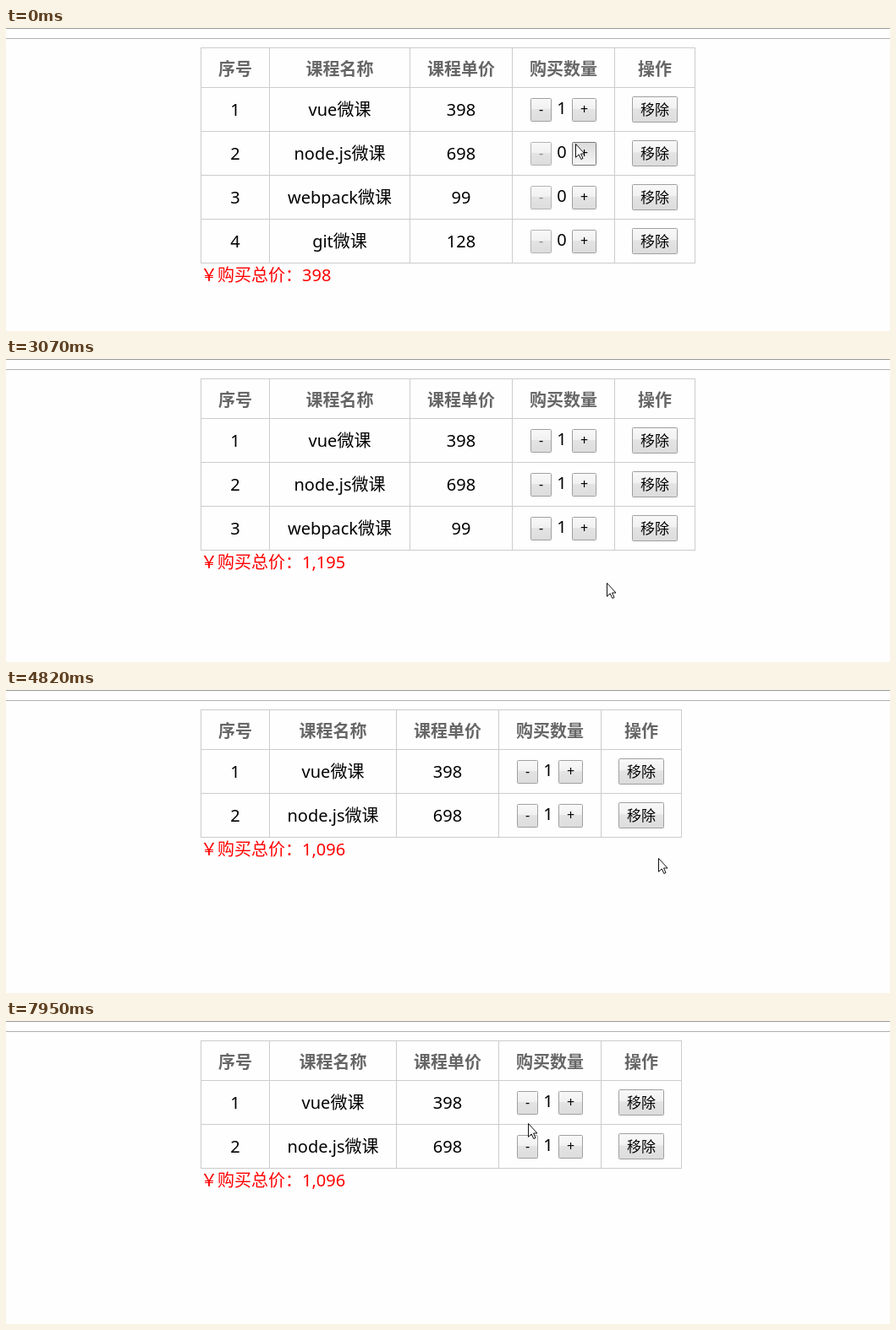
Recreate the animation shown at these times as an HTML page. Size 1045x359 px, loop 8 s.

```html
<!DOCTYPE html>
<html lang="zh-CN">
<head>
<meta charset="utf-8">
<title>购物车</title>
<style>
html, body { margin: 0; width: 100%; height: 100%; overflow: hidden; background: #fefefe; }
svg { display: block; width: 1045px; height: 359px; }
text { font: 20px "Noto Sans", "Noto Sans CJK SC", "Noto Sans CJK", sans-serif; text-anchor: middle; }
.head { font-weight: bold; fill: #666; }
.btn { font-size: 17px; }
.sign { font-size: 16px; }
.off { fill: #8a8a8a; }
.total { text-anchor: start; fill: #f00; }
.picked { fill: #fff; }
</style>
</head>
<body>
<svg viewBox="0 0 1045 359">
  <defs>
    <linearGradient id="up" x2="0" y2="1">
      <stop stop-color="#f8f8f8"/><stop offset=".46" stop-color="#f1f1f1"/>
      <stop offset=".47" stop-color="#e4e4e4"/><stop offset="1" stop-color="#dcdcdc"/>
    </linearGradient>
    <linearGradient id="over" x2="0" y2="1">
      <stop stop-color="#f2f2f2"/><stop offset="1" stop-color="#dfdfdf"/>
    </linearGradient>
    <linearGradient id="down" x2="0" y2="1">
      <stop stop-color="#dadada"/><stop offset="1" stop-color="#f6f6f6"/>
    </linearGradient>
  </defs>
  <path d="M0 .5H1045" stroke="#999"/>
  <path d="M0 12.5H1045" stroke="#b0b0b0"/>
  <g id="scene"></g>
</svg>
<script>
const LOOP = 8000, LEFT = 230, TOP = 23, HEAD = 47, ROW = 52;
const HEADS = ['序号', '课程名称', '课程单价', '购买数量', '操作'];
const courses = [
  { name: 'vue微课', price: 398, added: 0 },
  { name: 'node.js微课', price: 698, added: 150 },
  { name: 'webpack微课', price: 99, added: 830, removed: 4820 },
  { name: 'git微课', price: 128, added: 1385, removed: 2720 }
];
const presses = [[0, 150], [690, 830], [1250, 1385], [2590, 2720], [4700, 4820]];

// pointer strokes: first and last jump, jumps, bend x y, end x y
const strokes = [
  [286, 557, 3, 678, 170, 681, 199],
  [964, 1100, 2, 684, 228, 681, 252],
  [1520, 2060, 5, 772, 147, 779, 262],
  [2850, 3760, 8, 560, 275, 330, 240],
  [3890, 4150, 3, 430, 240, 585, 247],
  [4296, 4565, 3, 710, 235, 771, 199],
  [4960, 5370, 4, 680, 220, 575, 195],
  [5650, 5790, 2, 500, 195, 449, 190],
  [5930, 6080, 2, 530, 180, 621, 167],
  [6610, 6610, 1, 622, 167, 624, 166],
  [7010, 7480, 4, 530, 245, 489, 205],
  [7640, 7950, 3, 525, 160, 617, 121]
];

const scene = document.getElementById('scene');
const text = (x, y, value, cls = '') => `<text x="${x}" y="${y}" class="${cls}">${value}</text>`;
const rect = (x, y, w, h, rest) => `<rect x="${x}" y="${y}" width="${w}" height="${h}" ${rest}/>`;

function mouseAt(t) {
  let x = 673, y = 137;
  for (const [from, to, n, bx, by, ex, ey] of strokes) {
    if (t < from) break;
    const gap = (to - from) / (n - 1) || 1;
    const k = Math.min(1, (Math.floor((t - from) / gap + .01) + 1) / n);
    const p = k * k * (3 - 2 * k), q = 1 - p;
    const bend = (a, b, c) => Math.round(q * q * a + 2 * q * p * b + p * p * c);
    x = bend(x, bx, ex);
    y = bend(y, by, ey);
  }
  return { x, y, down: presses.some(([a, b]) => t >= a && t < b) };
}

function button(x, y, w, h, label, cls, mouse, off) {
  const over = !off && mouse.x >= x && mouse.x < x + w && mouse.y >= y && mouse.y < y + h;
  const look = over ? (mouse.down ? 'down' : 'over') : 'up';
  const edge = over ? '#777' : off ? '#b4b4b4' : '#a0a0a0';
  const drop = cls === 'btn' ? 6.5 : 4.5;
  return rect(x + .5, y + .5, w - 1, h - 1, `rx="1" fill="url(#${look})" stroke="${edge}"`) +
    text(x + w / 2, y + h / 2 + drop, label, cls + (off ? ' off' : ''));
}

function total(y, sum, end) {
  const label = text(LEFT, y, '￥购买总价：' + sum.toLocaleString('en-US'), 'total');
  if (!end) return label;
  const box = [330, y - 21, end - 330, 26];
  return label + `<clipPath id="sel">${rect(...box, '')}</clipPath>` +
    rect(...box, 'fill="#3390ff"') +
    `<g clip-path="url(#sel)">${label.replace('"total"', '"total picked"')}</g>`;
}

function table(t, mouse) {
  const rows = courses.filter(c => !(t >= c.removed));
  const xs = [LEFT];
  for (const w of [81, rows.length > 2 ? 166 : 150, 121, 121, 95]) xs.push(xs[xs.length - 1] + w);
  const mid = xs.slice(1).map((x, i) => (xs[i] + x + 1) / 2);
  const right = xs[5] + 1, bottom = TOP + HEAD + rows.length * ROW;

  let grid = `M${LEFT} ${TOP + .5}H${right}`;
  for (let y = TOP + HEAD; y <= bottom; y += ROW) grid += `M${LEFT} ${y + .5}H${right}`;
  for (const x of xs) grid += `M${x + .5} ${TOP}V${bottom + 1}`;
  let out = `<path d="${grid}" stroke="#ccc" shape-rendering="crispEdges"/>`;

  HEADS.forEach((h, i) => out += text(mid[i], TOP + 32.5, h, 'head'));
  let sum = 0;
  rows.forEach((c, i) => {
    const y = TOP + HEAD + i * ROW;
    const count = t >= c.added ? 1 : 0;
    sum += count * c.price;
    out += [i + 1, c.name, c.price].map((v, k) => text(mid[k], y + 34, v)).join('');
    out += text(xs[3] + 59, y + 32, count);
    out += button(xs[3] + 22, y + 13, 25, 28, '-', 'sign', mouse, !count);
    out += button(xs[3] + 71, y + 13, 29, 28, '+', 'sign', mouse);
    out += button(xs[4] + 21, y + 11, 54, 31, '移除', 'btn', mouse);
  });
  const picked = t >= 3890 && t < 4700 ? Math.min(402, mouse.x) : 0;
  return out + total(bottom + 22, sum, picked);
}

function pointer({ x, y }, beam) {
  const d = beam
    ? 'M-3-8H3M0-8V8M-3 8H3'
    : 'M.5.5V16.3L4.2 12.9 6.8 18.5 9 17.5 6.5 12H11Z';
  return `<path transform="translate(${x} ${y})" d="${d}" fill="${beam ? 'none' : '#fff'}" stroke="#111"/>`;
}

let shown = '';
function render(t) {
  const mouse = mouseAt(t);
  const next = table(t, mouse) + pointer(mouse, t >= 3500 && t < 4020);
  if (next !== shown) scene.innerHTML = shown = next;
}

const start = performance.now();
function tick() {
  render((performance.now() - start) % LOOP);
  requestAnimationFrame(tick);
}
tick();
</script>
</body>
</html>
```
